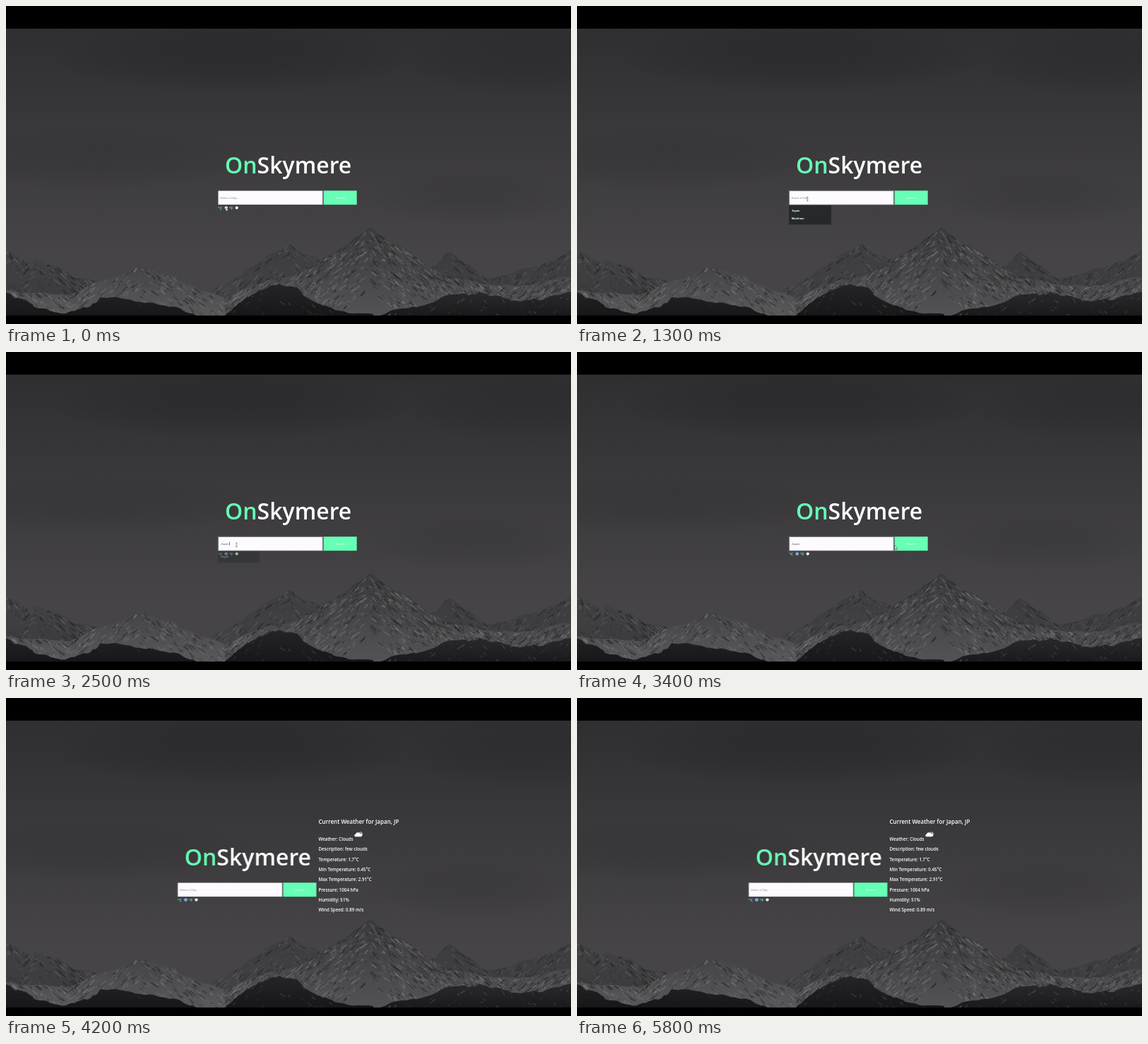
Write an HTML page with a canvas that moves like this. It is 800 px wide and 450 px high and loops after 6700 ms.

```html
<!DOCTYPE html>
<html lang="en">
<head>
<meta charset="utf-8">
<title>OnSkymere</title>
<style>
html, body { margin: 0; width: 100%; height: 100%; overflow: hidden; background: #000; }
canvas, svg { position: absolute; left: 0; top: 0; width: 800px; height: 450px; }
text { font-family: "Open Sans", "Noto Sans", sans-serif; font-weight: 600; fill: #fff; }
.ui text { font: 4.3px "Liberation Sans", Arial, sans-serif; }
.ui .logo { font: 600 32px "Open Sans", "Noto Sans", sans-serif; }
.ui .unit { font: 600 6px "Open Sans", "Noto Sans", sans-serif; }
.ui .option { font-weight: bold; font-size: 4px; }
.results text { font-size: 6.2px; }
.results .head { font-size: 8.04px; }
.mint, .ui .unit { fill: #66ffb5; }
.ui .hint { fill: #858387; }
.ui .typed { fill: #656367; }

/* One loop is 6.7 s; 100 ms is 1.4925 % */
.ui, .results, .checked, .ring, .list, .short, .long, .hint, .typed, .caret, .button, .arrow, .beam, .hand {
  animation: 6.7s step-end infinite;
}
.ui { animation-name: shift; }
.results { animation-name: results; }
.checked { animation-name: checked; }
.ring { animation-name: ring; }
.list { animation-name: list; }
.long { animation-name: long; }
.short { animation-name: short; }
.hint { animation-name: hint; }
.typed { animation-name: typed; }
.caret { animation-name: caret; }
.button { animation-name: button; }
.arrow { animation-name: arrow; }
.beam { animation-name: beam; }
.hand { animation-name: hand; }
.pointer { animation: pointer 6.7s infinite; }
.typed tspan { fill-opacity: 0; animation: key 6.7s step-end var(--at) infinite; }

@keyframes shift { 0% { transform: none } 62.68%, 100% { transform: translateX(-57.3px) } }
@keyframes results { 0% { opacity: 0 } 62.68%, 100% { opacity: 1 } }
@keyframes checked { 0% { opacity: 0 } 4.47%, 100% { opacity: 1 } }
@keyframes ring { 0% { opacity: 0 } 8.95% { opacity: 1 } 56.71%, 100% { opacity: 0 } }
@keyframes list {
  0% { opacity: 0 } 10.44% { opacity: 1 } 35.82% { opacity: .7 }
  37.31% { opacity: .36 } 38.8% { opacity: .13 } 40.29%, 100% { opacity: 0 }
}
@keyframes long { 0% { opacity: 1 } 25.37%, 100% { opacity: 0 } }
@keyframes short { 0% { opacity: 0 } 25.37%, 100% { opacity: 1 } }
@keyframes hint { 0% { opacity: 1 } 25.37% { opacity: 0 } 62.68%, 100% { opacity: 1 } }
@keyframes typed { 0% { opacity: 0 } 25.37% { opacity: 1 } 62.68%, 100% { opacity: 0 } }
@keyframes key { 0% { fill-opacity: 1 } 50%, 100% { fill-opacity: 0 } }
@keyframes caret { 0% { opacity: 0 } 35.82% { opacity: 1 } 43.28%, 100% { opacity: 0 } }
@keyframes button {
  0% { fill: #66ffb5 } 52.23% { fill: #60f4ad } 53.73% { fill: #59e6a3 } 62.68%, 100% { fill: #66ffb5 }
}
@keyframes arrow { 0% { opacity: 1 } 7.46% { opacity: 0 } 50.74% { opacity: 1 } 52.23%, 100% { opacity: 0 } }
@keyframes beam { 0% { opacity: 0 } 7.46% { opacity: 1 } 50.74%, 100% { opacity: 0 } }
@keyframes hand { 0% { opacity: 0 } 52.23% { opacity: 1 } 62.68%, 100% { opacity: 0 } }
@keyframes pointer {
  0%, 2.98% { transform: translate(311px, 285px); animation-timing-function: steps(7) }
  13.43%, 41.79% { transform: translate(326.3px, 273px); animation-timing-function: steps(6) }
  50.74% { transform: translate(450px, 274px); animation-timing-function: steps(4) }
  56.71%, 100% { transform: translate(471px, 270.5px) }
}
</style>
</head>
<body>
<canvas id="scene" width="800" height="450"></canvas>
<svg viewBox="0 0 800 450">
  <g class="ui">
    <text class="logo" x="399.7" y="237" text-anchor="middle"><tspan class="mint">On</tspan>Skymere</text>
    <rect x="300.5" y="261.5" width="147.8" height="19.6" fill="#fdfbff"/>
    <rect class="ring" x="300.3" y="261.3" width="148.4" height="20" fill="none" stroke="#737175"/>
    <text class="hint" x="304" y="272.6">Enter a City...</text>
    <text class="typed" x="304" y="272.6"><tspan style="--at:1.7s">J</tspan><tspan style="--at:1.8s">a</tspan><tspan style="--at:2s">p</tspan><tspan style="--at:2.2s">a</tspan><tspan style="--at:2.4s">n</tspan></text>
    <rect class="caret" x="316.2" y="268.6" width=".6" height="5" fill="#333"/>
    <rect class="button" x="449.6" y="261.3" width="47.1" height="19.9" fill="#66ffb5"/>
    <text x="473.2" y="272.7" text-anchor="middle" opacity=".85">Search</text>

    <text class="unit" x="300" y="287.6">°C</text>
    <circle cx="311.7" cy="285.6" r="2.1" fill="#fff"/>
    <g class="checked">
      <circle cx="311.7" cy="285.6" r="1.8" fill="#dcecff" stroke="#3a86e0" stroke-width=".7"/>
      <circle cx="311.7" cy="285.6" r="1.05" fill="#2879dc"/>
    </g>
    <text class="unit" x="315.8" y="287.6">°F</text>
    <circle cx="326.7" cy="285.6" r="2.1" fill="#fff"/>

    <g class="list">
      <g class="long">
        <rect x="300" y="282" width="60" height="27.2" fill="#25292c"/>
        <text class="option" x="304" y="302.4">Markham</text>
      </g>
      <rect class="short" x="300" y="282" width="59.3" height="16" fill="#25292c"/>
      <text class="option" x="304" y="291.3">Japan</text>
    </g>
  </g>

  <g class="results">
    <text class="head" x="442.5" y="177.6">Current Weather for Japan, JP</text>
    <g id="facts"></g>
    <g fill="#fff">
      <circle cx="502" cy="192.4" r="2.5" fill="none" stroke="#fff" stroke-width=".8"/>
      <path d="M494.6 196.2a1.8 1.8 0 0 1 .2-3.5a3.6 3.6 0 0 1 6.4-.9a2.3 2.3 0 0 1 1.6 4.4z"/>
    </g>
  </g>

  <g class="pointer">
    <path class="arrow" d="M0 0V5.2L1.3 4.1L2.1 6L3.1 5.6L2.3 3.8H4z" fill="#fff" stroke="#222" stroke-width=".5"/>
    <path class="beam" d="M-1-2.8H1M0-2.8V2.8M-1 2.8H1" fill="none" stroke="#555" stroke-width=".7"/>
    <path class="hand" d="M-.6-2q.6-.8 1.2 0V0L2.4.6V2.6L1.7 4H-.8L-2.4 1.5L-1.6 1L-.6 1.8z" fill="#fff" stroke="#333" stroke-width=".5"/>
  </g>
</svg>
<script>
const facts = ["Weather: Clouds", "Description: few clouds", "Temperature: 1.7°C", "Min Temperature: 0.45°C",
  "Max Temperature: 2.91°C", "Pressure: 1004 hPa", "Humidity: 51%", "Wind Speed: 0.89 m/s"];
document.getElementById("facts").innerHTML = facts
  .map((line, i) => `<text x="442.5" y="${202 + i * 14.33}">${line}</text>`).join("");

const ctx = document.getElementById("scene").getContext("2d");
let seed = 29;
const rnd = () => (seed = (seed * 16807) % 2147483647) / 2147483647;

function shade(top, bottom, y0, y1) {
  const g = ctx.createLinearGradient(0, y0, 0, y1);
  g.addColorStop(0, top);
  g.addColorStop(1, bottom);
  return g;
}

// Adds jagged midpoints to a coarse skyline
function rough(pts, amp, depth = 3) {
  if (!depth) return pts;
  const out = [pts[0]];
  for (let i = 1; i < pts.length; i++) {
    const [a, b] = [pts[i - 1], pts[i]];
    out.push([(a[0] + b[0]) / 2, (a[1] + b[1]) / 2 + (rnd() - .5) * amp], b);
  }
  return rough(out, amp / 1.7, depth - 1);
}

// Fills a mountain and scatters snow and rock along its slopes
function ridge(flat, amp, top, bottom, flecks, glow) {
  const coarse = [];
  for (let i = 0; i < flat.length; i += 2) coarse.push([flat[i], flat[i + 1]]);
  const pts = rough(coarse, amp);
  const peak = Math.min(...pts.map(p => p[1]));
  const left = pts[0][0], right = pts[pts.length - 1][0];
  ctx.save();
  ctx.beginPath();
  ctx.moveTo(left, 438);
  pts.forEach(p => ctx.lineTo(...p));
  ctx.lineTo(right, 438);
  ctx.fillStyle = shade(top, bottom, peak, 438);
  ctx.fill();
  ctx.clip();
  for (let i = 0; i < flecks; i++) {
    const x = left + rnd() * (right - left);
    const k = Math.max(1, coarse.findIndex(p => p[0] >= x));
    const [a, b] = [coarse[k - 1], coarse[k]];
    const slope = (b[1] - a[1]) / (b[0] - a[0]);
    const y = a[1] + (x - a[0]) * slope + Math.pow(rnd(), 1.3) * 90;
    const dir = slope < 0 ? -1 : 1, len = 2 + rnd() * 9;
    const tone = rnd() < .5 ? 28 : glow;
    ctx.strokeStyle = `rgba(${tone},${tone},${tone + 1},${.12 + rnd() * .4})`;
    ctx.lineWidth = .6 + rnd() * 1.6;
    ctx.beginPath();
    ctx.moveTo(x, y);
    ctx.lineTo(x + dir * len * (.4 + rnd() * .6), y + len * .65);
    ctx.stroke();
  }
  ctx.restore();
}

function cloud(x, y, rx, ry, color) {
  ctx.save();
  ctx.translate(x, y);
  ctx.scale(rx, ry);
  const g = ctx.createRadialGradient(0, 0, 0, 0, 0, 1);
  g.addColorStop(0, color);
  g.addColorStop(1, "transparent");
  ctx.fillStyle = g;
  ctx.fillRect(-1, -1, 2, 2);
  ctx.restore();
}

ctx.beginPath();
ctx.rect(0, 32, 800, 406);
ctx.clip();
ctx.fillStyle = shade("#2f2e30", "#464447", 32, 350);
ctx.fillRect(0, 32, 800, 406);
cloud(320, 75, 260, 50, "rgba(25,24,26,.22)");
cloud(740, 80, 180, 50, "rgba(25,24,26,.16)");
cloud(120, 215, 240, 45, "rgba(30,29,31,.14)");
cloud(660, 270, 150, 40, "rgba(30,29,31,.12)");

ridge([0, 347, 28, 361, 45, 360, 70, 368, 95, 384, 125, 388, 160, 408], 7, "#424143", "#39383a", 420, 102);
ridge([290, 402, 330, 383, 360, 362, 385, 346, 403, 337, 425, 352, 445, 358, 485, 390], 6, "#3d3c3e", "#444345", 420, 98);
ridge([590, 378, 613, 362, 627, 348, 650, 365, 680, 385, 720, 377, 760, 365, 800, 345], 6, "#3c3b3d", "#414042", 480, 95);
ridge([0, 402, 40, 406, 90, 409, 130, 390, 165, 379, 190, 368, 215, 377, 240, 382, 275, 402, 340, 422], 6, "#444345", "#59585a", 1000, 128);
ridge([310, 414, 370, 388, 420, 376, 450, 356, 475, 343, 495, 327, 513, 315, 530, 324,
  548, 337, 575, 350, 600, 370, 640, 386, 700, 396, 750, 393, 800, 384], 6, "#3a393b", "#535254", 2000, 132);
ridge([0, 405, 20, 414, 40, 426, 85, 435, 118, 426, 135, 412, 190, 419, 245, 427, 270, 438], 7, "#222123", "#171618", 70, 75);
ridge([310, 438, 335, 417, 360, 402, 387, 393, 412, 398, 432, 416, 465, 430, 520, 436], 7, "#252426", "#171618", 130, 85);
ridge([530, 438, 590, 424, 640, 408, 670, 404, 710, 414, 760, 416, 800, 404], 8, "#2a292b", "#1a191b", 230, 85);
</script>
</body>
</html>
```
